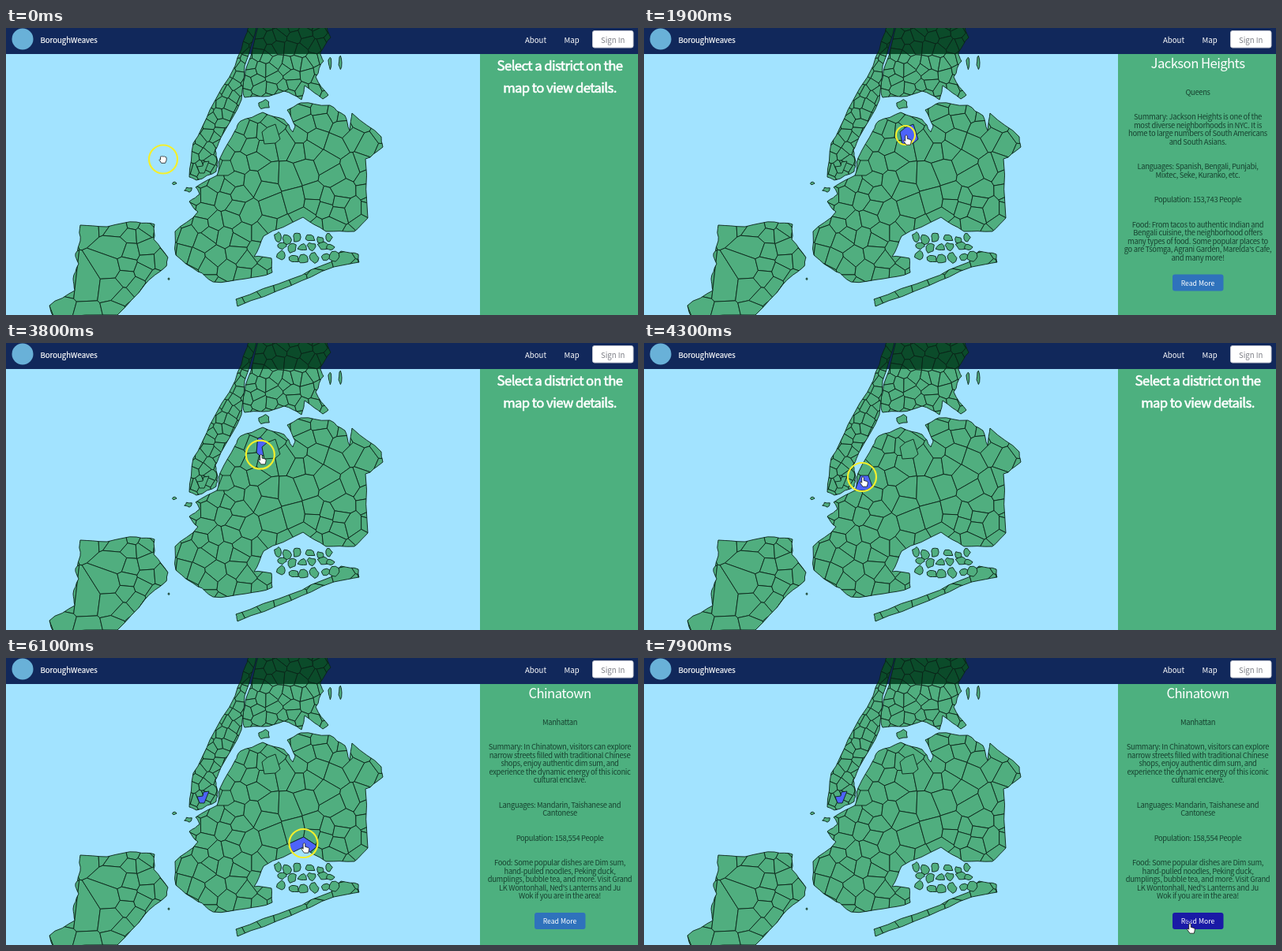
Write an HTML page that moves like this. It is 800 px wide and 364 px high and loops after 8 s.

```html
<!DOCTYPE html>
<html lang="en">
<head>
<meta charset="utf-8">
<title>District map</title>
<style>
  html, body { margin: 0; width: 100%; height: 100%; overflow: hidden; background: #a2e3ff; }
  svg { display: block; width: 800px; height: 364px; --land: #50ae7f; }
  text { font-family: "Noto Sans CJK SC", "Noto Sans CJK JP", "Noto Sans CJK", "Open Sans", sans-serif; }
  .cell, .coast { stroke: #0b2418; stroke-width: .9; stroke-linejoin: round; }
  .cell { fill: var(--land); }
  .coast { fill: none; }
  .nav { font-size: 9.6px; fill: #fff; }
  .big { font-size: 16.7px; fill: #fff; letter-spacing: -.034em; text-anchor: middle; }
  .prompt { stroke: #fff; stroke-width: .6; }
  .body { font-size: 9.4px; fill: #17412f; letter-spacing: -.034em; text-anchor: middle; }
  .more { font-size: 8.7px; text-anchor: middle; }
</style>
</head>
<body>
<svg id="stage" viewBox="0 0 800 364">
  <defs><clipPath id="bar"><rect width="600" height="33"/></clipPath></defs>
  <rect width="800" height="364" fill="#a2e3ff"/>
  <g id="map"></g>
  <rect width="800" height="33" fill="#11285b"/>
  <g clip-path="url(#bar)"><use href="#map" style="--land:#0b4b2a"/></g>
  <circle cx="21" cy="14" r="13.5" fill="#69b1d8"/>
  <text class="nav" x="43.5" y="18.5" stroke="#fff" stroke-width=".2">BoroughWeaves</text>
  <text class="nav" x="657" y="18.5">About</text>
  <text class="nav" x="706.5" y="18.5">Map</text>
  <rect x="742.5" y="3.5" width="51.5" height="21.5" rx="2.5" fill="#fff" stroke="#c3c5cf"/>
  <text class="nav" x="753" y="18.5" style="fill:#7d7f86">Sign In</text>
  <rect x="600" y="33" width="200" height="331" fill="#4db07f"/>
  <g id="panels"></g>
  <g id="cursor">
    <circle id="ring" fill="none"/>
    <path id="hand" fill="#fff" stroke-width=".8" stroke-linejoin="round"/>
  </g>
</svg>
<script>
const $ = id => document.getElementById(id);
const stage = $('stage'), map = $('map');

function add(parent, tag, attrs, text) {
  const node = document.createElementNS('http://www.w3.org/2000/svg', tag);
  set(node, attrs);
  if (text) node.textContent = text;
  return parent.appendChild(node);
}
function set(node, attrs) {
  for (const key in attrs) node.setAttribute(key, attrs[key]);
}

let seed = 11;
const random = () => (seed = (seed * 16807) % 2147483647) / 2147483647;
const spread = amount => (random() - .5) * 2 * amount;
const toPath = points => 'M' + points.map(p => p.map(v => v.toFixed(1)).join(' ')).join('L') + 'Z';
const parse = text => text.split(' ').map(pair => pair.split(',').map(Number));

// Splits long edges at displaced midpoints, for an uneven shore.
function roughen(points) {
  const split = list => list.flatMap((p, i) => {
    const q = list[(i + 1) % list.length];
    const length = Math.hypot(q[0] - p[0], q[1] - p[1]);
    const wobble = Math.min(1.2, length / 10);
    return length < 4 ? [p] : [p, [(p[0] + q[0]) / 2 + spread(wobble), (p[1] + q[1]) / 2 + spread(wobble)]];
  });
  return split(split(points));
}

// Keeps the part of a polygon that is nearer to a than to b.
function nearer(polygon, a, b) {
  const dx = b[0] - a[0], dy = b[1] - a[1];
  const side = p => (p[0] - (a[0] + b[0]) / 2) * dx + (p[1] - (a[1] + b[1]) / 2) * dy;
  return polygon.flatMap((p, i) => {
    const q = polygon[(i + 1) % polygon.length], s = side(p), e = side(q);
    const kept = s <= 0 ? [p] : [];
    if (s * e < 0) {
      const k = s / (s - e);
      kept.push([p[0] + (q[0] - p[0]) * k, p[1] + (q[1] - p[1]) * k]);
    }
    return kept;
  });
}

function jitteredGrid(points, size, angle, density) {
  const xs = points.map(p => p[0]), ys = points.map(p => p[1]);
  const x0 = Math.min(...xs), x1 = Math.max(...xs), y0 = Math.min(...ys), y1 = Math.max(...ys);
  const n = Math.ceil(Math.hypot(x1 - x0, y1 - y0) / 2 / size);
  const c = Math.cos(angle), s = Math.sin(angle), sites = [];
  for (let i = -n; i <= n; i++) for (let j = -n; j <= n; j++) {
    const u = (i + spread(.36)) * size, v = (j + spread(.36)) * size;
    const x = (x0 + x1) / 2 + u * c - v * s, y = (y0 + y1) / 2 + u * s + v * c;
    const near = x > x0 - size && x < x1 + size && y > y0 - size && y < y1 + size;
    if (near && random() < density(x)) sites.push([x, y]);
  }
  return sites;
}

const lands = [];
function addLand(outline, size, angle, density = () => 1) {
  const points = parse(outline), d = toPath(roughen(points)), id = 'land' + lands.length;
  add(add(map, 'clipPath', { id }), 'path', { d });
  const group = add(map, 'g', { 'clip-path': `url(#${id})` });
  const sites = jitteredGrid(points, size, angle, density);
  const cells = sites.map(a => {
    const square = [[-90, -90], [90, -90], [90, 90], [-90, 90]].map(p => [a[0] + p[0], a[1] + p[1]]);
    const polygon = sites.reduce((rest, b) => b === a ? rest : nearer(rest, a, b), square);
    return add(group, 'path', { class: 'cell', d: toPath(polygon) });
  });
  lands.push({ sites, cells, coast: add(map, 'path', { class: 'coast', d }) });
}

// Staten Island
addLand('94,250 128,252 165,246 188,249 187,268 205,291 203,302 176,325 141,364 60,366 55,352 87,333 85,318 92,299 88,286 94,270',
  18, .5, x => x > 140 ? 1 : .42);
// Manhattan
addLand('232,189 237,146 258,104 290,48 304,8 309,-6 318,-6 302,48 298,91 272,139 265,155 268,170 266,182 241,193', 12, .5);
// Bronx
addLand('320,-6 404,-6 411,12 398,31 402,42 392,62 408,85 401,90 378,73 374,91 352,80 326,87 302,88 300,77 305,48', 14, .25);
// Brooklyn and Queens
addLand('297,118 325,107 352,116 363,132 366,124 356,104 373,95 410,98 429,111 435,130 438,108 475,138 477,151 455,166 458,241 441,258 405,258 376,240 326,264 314,290 336,292 337,310 303,318 262,322 243,309 215,288 214,258 243,233 232,220 245,211 240,202 269,186 271,165 290,130',
  20, .4, x => x < 320 ? 1 : .85);
// Rockaway
addLand('291,344 362,318 411,297 424,283 446,287 447,297 415,303 360,327 293,353', 22, -.4);

function addIsle(x, y, w, h) {
  const points = Array.from({ length: 9 }, (_, i) => {
    const a = i / 9 * 2 * Math.PI, k = .65 + random() * .5;
    return [x + Math.cos(a) * w * k, y + Math.sin(a) * h * k];
  });
  add(map, 'path', { class: 'cell', d: toPath(points) });
}
addIsle(327, 97, 8, 6);
addIsle(231, 205, 5, 3);
addIsle(213, 197, 3, 2);
addIsle(206, 318, 1, 1.5);
for (const x of [410, 423]) addIsle(x, 44, 2, 8);

// Marsh islands in the bay: three staggered rows.
for (let row = 0; row < 3; row++)
  for (let i = 0; i < 6; i++)
    addIsle(343 + i * 13 + row * 4 + spread(3), 266 + row * 12 + spread(3), 4 + random() * 3, 4 + random() * 3);

const district = outline => add(map, 'path', { class: 'cell', d: toPath(parse(outline)) });
const jackson = district('324,132 331,126 341,122 347,141 341,146 327,147');
const waterside = district('267,187 274,168 284,168 289,182 281,187');
const chinatown = district('242,176 249,175 250,170 257,169 251,184 245,184');

function addPanel(title, paragraphs) {
  const group = add($('panels'), 'g', {});
  add(group, 'text', { class: 'big', x: 701, y: 51 }, title);
  let y = 84.5;
  for (const paragraph of paragraphs) {
    for (const line of paragraph.split('|')) {
      add(group, 'text', { class: 'body', x: 701, y }, line);
      y += 10.5;
    }
    y += 21;
  }
  const button = add(group, 'rect', { x: 669, y: y - 13.5, width: 64.5, height: 21, rx: 3 });
  add(group, 'text', { class: 'nav more', x: 701, y: y + .5 }, 'Read More');
  return { group, button };
}

const prompt = add($('panels'), 'g', {});
add(prompt, 'text', { class: 'big prompt', x: 701, y: 53.5 }, 'Select a district on the');
add(prompt, 'text', { class: 'big prompt', x: 701, y: 81.5 }, 'map to view details.');
const jacksonPanel = addPanel('Jackson Heights', [
  'Queens',
  'Summary: Jackson Heights is one of the|most diverse neighborhoods in NYC. It is|home to large numbers of South Americans|and South Asians.',
  'Languages: Spanish, Bengali, Punjabi,|Mixtec, Seke, Kuranko, etc.',
  'Population: 153,743 People',
  'Food: From tacos to authentic Indian and|Bengali cuisine, the neighborhood offers|many types of food. Some popular places to|go are Tsomga, Agrani Garden, Marelda\'s Cafe,|and many more!'
]);
const chinatownPanel = addPanel('Chinatown', [
  'Manhattan',
  'Summary: In Chinatown, visitors can explore|narrow streets filled with traditional Chinese|shops, enjoy authentic dim sum, and|experience the dynamic energy of this iconic|cultural enclave.',
  'Languages: Mandarin, Taishanese and|Cantonese',
  'Population: 158,554 People',
  'Food: Some popular dishes are Dim sum,|hand-pulled noodles, Peking duck,|dumplings, bubble tea, and more. Visit Grand|LK Wontonhall, Ned\'s Lanterns and Ju|Wok if you are in the area!'
]);

// Cursor moves: start time, end time, x, y. It rests in between.
const moves = [
  [0, 0, 199, 166.5], [200, 500, 300, 113], [500, 700, 427, 266], [900, 1100, 336, 130],
  [1100, 1300, 331, 136], [3700, 4300, 276, 170], [4300, 4600, 281, 206], [4600, 4700, 250, 177],
  [5700, 5800, 325, 219], [5900, 6600, 505, 275], [6700, 6900, 665, 293], [7200, 7600, 690, 337]
];
const clicks = [1800, 3100, 5400, 7900];
const shapes = {
  pointer: 'M-1.3 .6q1.3-1.7 2.6 0v3.8l3.8 1q1.6.5 1.2 2.5l-1 4.3h-5.3l-3.5-4.9q0-1.5 1.4-1l.8 1z',
  grab: 'M-3.5-.5v-2.7q1-1.5 2 0q1-1.7 2 0q1-1.4 2 .4q1.4-.6 1.6 1v3l-1.5 3.6h-5l-2.6-4q.7-1.3 1.5-.3z',
  text: 'M-2-4h4M0-4v8M-2 4h4'
};

function cursorAt(t) {
  let [, , x, y] = moves[0];
  for (const [from, to, toX, toY] of moves.slice(1)) {
    const k = Math.min(1, Math.max(0, (t - from) / (to - from)));
    x += (toX - x) * k;
    y += (toY - y) * k;
  }
  return [x, y];
}

function cellAt(x, y) {
  const point = Object.assign(stage.createSVGPoint(), { x, y });
  const named = [jackson, waterside, chinatown].find(d => d.isPointInFill(point));
  if (named) return named;
  const land = lands.find(l => l.coast.isPointInFill(point));
  if (!land) return null;
  const gaps = land.sites.map(s => Math.hypot(s[0] - x, s[1] - y));
  return land.cells[gaps.indexOf(Math.min(...gaps))];
}

const show = (group, on) => set(group, { visibility: on ? 'visible' : 'hidden' });
let lit = [];

function render(t) {
  const [x, y] = cursorAt(t);
  const sinceClick = Math.min(...clicks.map(c => t >= c ? t - c : Infinity));
  const pressed = sinceClick < 100;
  const hovered = cellAt(x, y);
  const panel = t >= 1900 && t < 3200 ? jacksonPanel : t >= 5500 ? chinatownPanel : null;
  const selected = panel === jacksonPanel ? jackson : panel && chinatown;

  lit.forEach(cell => cell.style.fill = '');
  lit = [selected, hovered].filter(Boolean);
  lit.forEach(cell => cell.style.fill = pressed && cell === hovered ? '#343cf2' : '#4d63fa');

  show(prompt, !panel);
  for (const p of [jacksonPanel, chinatownPanel]) show(p.group, p === panel);
  const onButton = x > 669 && y > 330;
  if (panel) set(panel.button, { fill: onButton ? '#1a1aa6' : '#2f72bc' });

  set($('cursor'), { transform: `translate(${x} ${y})` });
  set($('ring'), {
    r: pressed ? 4.5 : sinceClick < 200 ? 12 : 18,
    stroke: pressed ? '#1c1cb4' : '#f4ef2c',
    'stroke-width': pressed ? 1.2 : 2.2
  });
  const shape = hovered || onButton ? 'pointer' : x > 600 ? 'text' : 'grab';
  set($('hand'), { d: shapes[shape], stroke: shape === 'text' ? '#2b5f47' : '#111' });
  $('hand').style.transform = shape === 'pointer' ? 'translate(1px, 0)' : '';
}

const start = performance.now();
function tick() {
  const t = Math.max(0, performance.now() - start) % 8000;
  render(Math.floor(t / 100) * 100);
  requestAnimationFrame(tick);
}
tick();
</script>
</body>
</html>
```
